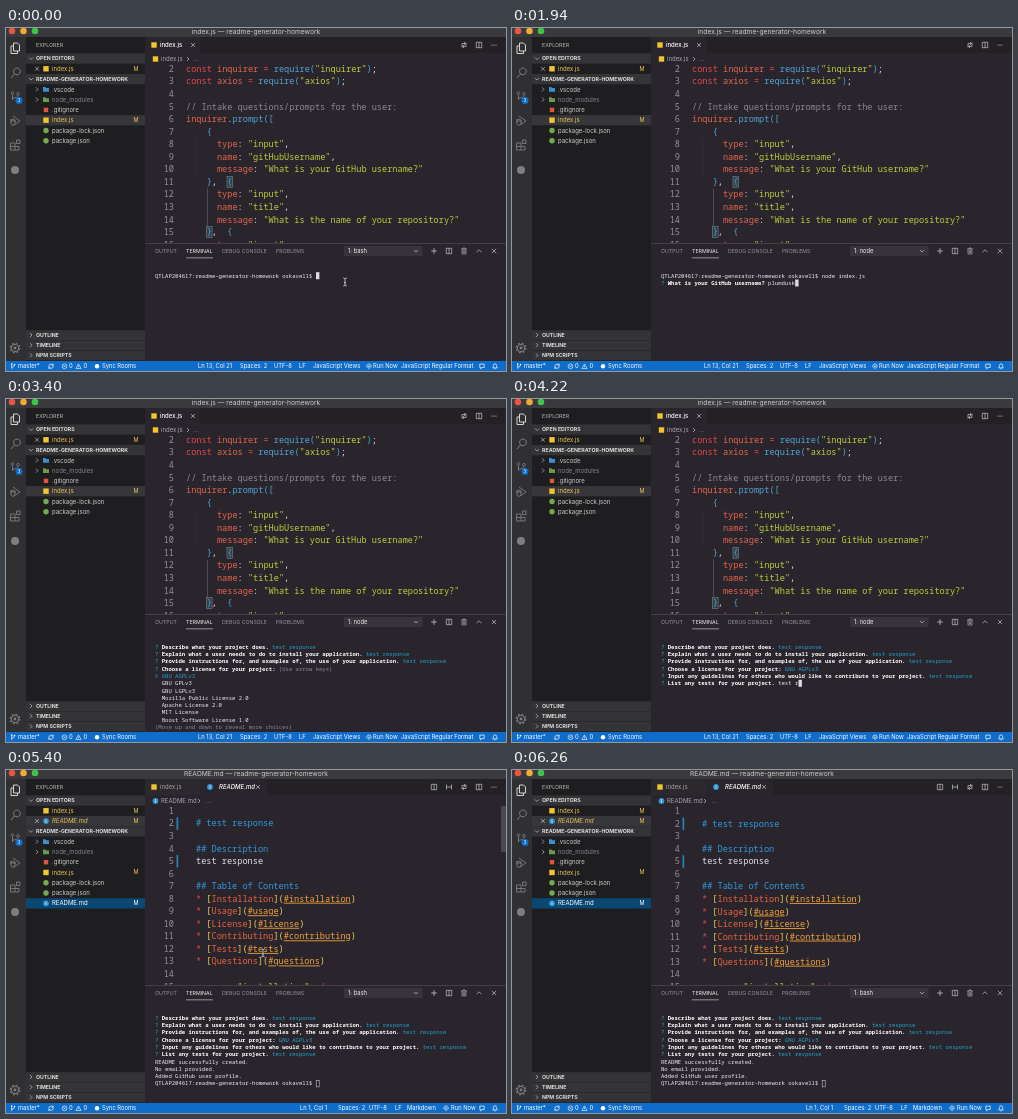
Animation of 500 by 343 pixels, one loop 6280 ms. Source, as an HTML page:

```html
<!DOCTYPE html>
<html lang="en">
<head>
<meta charset="utf-8">
<title>Readme generator demo</title>
<style>
  html, body { margin: 0; width: 100%; height: 100%; overflow: hidden; background: #1e1e20; }
  svg { display: block; width: 100vw; height: 100vh; }
  text { white-space: pre; }
  .ui { font-family: Inter, "Liberation Sans", sans-serif; }
  .mono { font-family: "Noto Sans Mono", "DejaVu Sans Mono", monospace; }
</style>
</head>
<body>
<svg id="stage" viewBox="0 0 500 343" preserveAspectRatio="none" xmlns="http://www.w3.org/2000/svg">
  <defs>
    <clipPath id="editorClip"><rect x="139" y="36" width="361" height="179"/></clipPath>
    <clipPath id="panelClip"><rect x="139" y="232" width="361" height="101"/></clipPath>
  </defs>
  <g id="chrome"></g>
  <g id="header"></g>
  <g id="sidebar"></g>
  <g clip-path="url(#editorClip)"><g id="editor"></g></g>
  <g id="panel"></g>
  <g clip-path="url(#panelClip)"><g id="terminal"></g></g>
  <g id="status"></g>
  <g id="mouse"></g>
</svg>
<script>
const LOOP = 6280, CODE = 8.6, CODE_ADV = 5.16, PITCH = 12.55;
const TERM = 5.59, TERM_ADV = 3.354, TERM_PITCH = 7.32;
const C = {
  red: '#e5484a', orange: '#e8643c', amber: '#f2a33a', yellow: '#f2d35b', lime: '#b9d03c', blue: '#2f9be0',
  sky: '#4fa6d6', white: '#e4e0e6', grey: '#8d8791', cyan: '#22a3cf', green: '#23c08a', mod: '#ecc257', icon: '#c5c5c8'
};
const LAUNCH_AT = 1080, WRITTEN_AT = 4380, FOCUS_AT = 4900, OPEN_AT = 5100;

const esc = s => s.replace(/&/g, '&amp;').replace(/</g, '&lt;');
const rect = (x, y, w, h, fill, extra = '') =>
  `<rect x="${x}" y="${y}" width="${w}" height="${h}" fill="${fill}" ${extra}/>`;
const dot = (x, y, r, fill) => `<circle cx="${x}" cy="${y}" r="${r}" fill="${fill}"/>`;
const stroke = (d, color = C.icon, w = .8, at = [0, 0]) =>
  `<path d="${d}" transform="translate(${at})" fill="none" stroke="${color}" stroke-width="${w}"/>`;
const ui = (x, y, s, size = 6, fill = '#ccc', extra = '') =>
  `<text class="ui" x="${x}" y="${y + size * .36}" font-size="${size}" fill="${fill}" ${extra}>${esc(s)}</text>`;
const mono = (x, y, size, parts, extra = '') =>
  `<text class="mono" x="${x}" y="${y + size * .34}" font-size="${size}" ${extra}>` +
  parts.map(([fill, s, attr = '']) => `<tspan fill="${fill}" ${attr}>${esc(s)}</tspan>`).join('') + '</text>';

const chevron = (x, y, open) =>
  stroke(open ? 'M-2 -1L0 1L2 -1' : 'M-1 -2L1 0L-1 2', C.icon, .7, [x, y]);
const cross = (x, y, r = 1.9) => stroke(`M${-r} ${-r}L${r} ${r}M${r} ${-r}L${-r} ${r}`, C.icon, .7, [x, y]);
const splitIcon = (x, y) => stroke('M-2.7 -2.7H2.7V2.7H-2.7ZM0 -2.7V2.7', C.icon, .7, [x, y]);
const info = (x, y) => dot(x, y, 2.9, '#2f94d6') + rect(x - .4, y - .5, .8, 2, '#fff') + rect(x - .4, y - 1.7, .8, .7, '#fff');
const scriptIcon = (x, y) => rect(x - 2.7, y - 2.7, 5.4, 5.4, '#f2c42e');
const folder = (x, y, fill) => `<path d="M${x - 3} ${y - 2.3}h2.3l.9 .9h2.8v3.8h-6z" fill="${fill}"/>`;

// Linear interpolation through [time, ...values] points
function track(t, points) {
  if (t <= points[0][0]) return points[0].slice(1);
  for (let i = 1; i < points.length; i++) {
    const [a, ...from] = points[i - 1], [b, ...to] = points[i];
    if (t <= b) return from.map((v, k) => v + (to[k] - v) * (t - a) / (b - a));
  }
  return points[points.length - 1].slice(1);
}

const cache = {};
function put(id, html) {
  if (cache[id] === html) return;
  cache[id] = html;
  document.getElementById(id).innerHTML = html;
}

function drawChrome() {
  const on = '#e6e6e6', off = '#7e7e82';
  let h = rect(0, 0, 500, 343, '#1e1e20') + rect(0, 0, 500, 9, '#3a393d') +
    rect(0, 9, 20, 324, '#303033') + rect(139, 9, 361, 324, '#2a242d');
  h += ['#e8563f', '#f3aa2f', '#3cc645'].map((c, i) => dot(6 + i * 11.5, 3, 3.3, c)).join('');
  h += stroke('M-2 -5H2L4 -3V3H-2ZM-2 -2H-4.5V5.5H2V3', on, .9, [9.5, 20]);
  h += stroke('M1 -5A3.4 3.4 0 1 1 .9 -5M-1.5 1L-5 5', off, 1, [10, 45]);
  h += stroke('M-2.5 -2.5V3M3 -2Q3 1 -2.5 1.2M-2.5 -5.3A1.3 1.3 0 1 1 -2.6 -5.3M3 -4.6A1.3 1.3 0 1 1 2.9 -4.6', off, .9, [9, 69]);
  h += dot(13, 72.5, 3.5, '#0f6cc9') + ui(13, 72.5, '3', 4.6, '#fff', 'text-anchor="middle"');
  h += stroke('M-2 -5L5 0L-1 4M-5 0H1M-4 -2V3Q-2 6 0 3V-1Q-2 -3 -4 -1', off, .9, [9, 93]);
  h += stroke('M-4.5 -2H0V5H-4.5ZM-4.5 1.5H4V5H0M1.5 -5H5V-1.5H1.5Z', off, .9, [9, 117]);
  h += dot(9, 142, 4, off);
  h += dot(9, 320, 1.4, off) + `<circle cx="9" cy="320" r="3.7" fill="none" stroke="${off}" stroke-width="1"/>` +
    `<circle cx="9" cy="320" r="4.8" fill="none" stroke="${off}" stroke-width="1.2" stroke-dasharray="1.9 1.87"/>`;
  h += ui(30, 17, 'EXPLORER', 5.3, '#bbb');
  ['OUTLINE', 'TIMELINE', 'NPM SCRIPTS'].forEach((s, i) => {
    const y = 307 + i * 10.2;
    h += rect(20, y - 4.8, 119, 9.8, '#343437') + chevron(25, y) + ui(30, y, s, 5.2, '#ddd', 'font-weight="700"');
  });
  put('chrome', h);
}

function drawHeader(opened) {
  const file = opened ? 'README.md' : 'index.js';
  let h = ui(250, 3.5, `${file} — readme-generator-homework`, 6.7, '#ccc', 'text-anchor="middle"');
  h += rect(139, 9, 361, 16, '#242126');
  h += opened ? rect(139, 9, 55.5, 16, '#2b282e') + rect(195, 9, 66, 16, '#2a242d') : rect(139, 9, 55.5, 16, '#2a242d');
  h += scriptIcon(148, 17) + ui(154, 17, 'index.js', 6, opened ? '#a5a0a8' : '#fff', opened ? '' : 'font-weight="500"');
  if (opened) h += info(204, 17) + ui(213, 17, 'README.md', 6, '#fff', 'font-style="italic" font-weight="500"') + cross(252, 17);
  else h += cross(187, 17);
  if (opened) h += splitIcon(428, 17) + stroke('M-2.5 -2.5V2.5M2.5 -2.5V2.5M-2.5 0H2.5', C.icon, .7, [443, 17]);
  h += stroke('M-2 2.5V-1.5H1M2 -2.5V1.5H-1M0 -3L1.5 -1.5L0 0M0 0L-1.5 1.5L0 3', C.icon, .7, [458, 17]);
  h += splitIcon(473, 17) + [-2, 0, 2].map(d => dot(488 + d, 17, .6, C.icon)).join('');
  h += (opened ? info : scriptIcon)(149.5, 31) + ui(155, 31, file, 6, '#aaa6ad') +
    chevron(opened ? 193 : 182, 31) + ui(opened ? 200 : 187, 31, '...', 6, '#aaa6ad');
  put('header', h);
}

function drawSidebar(hover, written, focused, opened) {
  let y = 30.5, h = '';
  const step = 10.28, active = '#0a4874', inactive = '#37373b';
  const bar = fill => rect(20, y - 5.1, 119, step, fill);
  const title = s => {
    h += bar('#343437') + chevron(25, y, true) + ui(30, y, s, 5.25, '#ddd', 'font-weight="700"');
    y += step;
  };
  const row = (icon, name, { fill = '#ccc', bg, modified, twisty, italic } = {}) => {
    const color = bg === active ? '#fff' : modified ? C.mod : fill;
    if (bg) h += bar(bg);
    if (twisty) h += chevron(31, y);
    h += icon + ui(46, y, name, 6, color, italic ? 'font-style="italic"' : '');
    if (modified) h += ui(130, y, 'M', 5.5, color, 'text-anchor="middle"');
    y += step;
  };
  title('OPEN EDITORS');
  if (!opened) h += cross(31, y);
  row(scriptIcon(40, y), 'index.js', { modified: true });
  if (opened) {
    h += bar(inactive) + cross(31, y);
    row(info(40, y), 'README.md', { modified: true, italic: true });
  }
  const headY = y;
  title(hover ? 'README-GENERAT...' : 'README-GENERATOR-HOMEWORK');
  if (hover) {
    h += stroke('M-2 -2.7H1V2.7H-2ZM1 1H3.5', C.icon, .7, [94, headY]) +
      stroke('M-3 -2H-.5L.5 -1H3V2.5H-3Z', C.icon, .7, [107, headY]) +
      stroke('M2.2 -1A2.5 2.5 0 1 0 2.3 1M2.5 -3V-.8H.5', C.icon, .7, [120, headY]) +
      stroke('M-2.5 -1H1.2V2.5H-2.5ZM-1 -1V-2.6H2.8V1H1.2M-1.5 .8H.3', C.icon, .7, [133, headY]);
  }
  row(folder(40, y, '#3c8fd0'), '.vscode', { twisty: true });
  row(folder(40, y, '#6c9a4a'), 'node_modules', { twisty: true, fill: '#858588' });
  row(rect(37.8, y - 2.2, 4.4, 4.4, '#e2553a'), '.gitignore');
  row(scriptIcon(40, y), 'index.js', { modified: true, bg: opened ? '' : focused ? active : inactive });
  row(dot(40, y, 2.7, '#72ad4b'), 'package-lock.json');
  row(dot(40, y, 2.7, '#72ad4b'), 'package.json');
  if (written) row(info(40, y), 'README.md', { modified: true, bg: opened ? active : hover ? '#2a2d2e' : '' });
  put('sidebar', h);
}

const question = (name, message) => ['      type: "input",', `      name: "${name}",`, `      message: "${message}"`];
const script = ['', 'const inquirer = require("inquirer");', 'const axios = require("axios");', '',
  '// Intake questions/prompts for the user:', 'inquirer.prompt([', '    {',
  ...question('gitHubUsername', 'What is your GitHub username?'), '    },  {',
  ...question('title', 'What is the name of your repository?'), '    },  {', '      type: "input",'];

const sections = ['Installation', 'Usage', 'License', 'Contributing', 'Tests', 'Questions'];
const readme = ['', '# test response', '', '## Description', 'test response', '', '## Table of Contents',
  ...sections.map(s => `* [${s}](#${s.toLowerCase()})`), '',
  ...sections.flatMap(s => [`<a name="${s.toLowerCase()}"></a>`, `## ${s}`, 'test response', ''])];

function paintScript(s) {
  if (s.startsWith('//')) return [[C.grey, s]];
  return (s.match(/"[^"]*"|\w+|\s+|[^\w\s"]/g) || []).map(w => [
    w[0] === '"' ? C.lime : w === 'const' || w === '=' ? C.red :
    /^(require|prompt|[()[\]{}])$/.test(w) ? C.sky : /^\w/.test(w) ? '#e2664c' : C.white, w]);
}

function paintReadme(s, i) {
  if (s[0] === '#') return [[C.blue, s]];
  const link = s.match(/^\* \[(\w+)\]\((.+)\)$/);
  if (link) return [[C.red, '* '], [C.yellow, '['], [C.orange, link[1]], [C.yellow, ']('],
    [C.amber, link[2], 'text-decoration="underline"'], [C.yellow, ')']];
  const anchor = s.match(/^<a name=(".+")><\/a>$/);
  if (anchor) return [[C.red, '<a '], [C.orange, 'name'], [C.white, '='], [C.lime, anchor[1]], [C.red, '></a>']];
  return [[i > 13 ? C.orange : C.white, s]];
}

function drawEditor(opened, scroll, hint) {
  const lines = opened ? readme : script;
  const top = opened ? 41.2 - scroll : 41 - PITCH;
  const x = opened ? 190 : 180;
  const yOf = n => top + (n - 1) * PITCH;
  let h = '';
  if (!opened) {
    h += rect(201, yOf(12) - 6, .5, PITCH * 3, '#77707b') + rect(190.5, yOf(8) - 6, .4, PITCH * 3, '#423b46');
    h += [[11, 8], [15, 4]].map(([n, col]) =>
      rect(x + col * CODE_ADV - .3, yOf(n) - 5.6, CODE_ADV + .6, 11, '#31404a', 'stroke="#87918f" stroke-width=".5"')).join('');
    if (hint) h += dot(146, yOf(14), 1.8, '#8c2831');
  }
  lines.forEach((s, i) => {
    const y = yOf(i + 1);
    if (y < 25 || y > 225) return;
    h += mono(168, y, CODE, [['#96909a', String(i + 1)]], 'text-anchor="end"');
    h += mono(x, y, CODE, (opened ? paintReadme : paintScript)(s, i));
    if (opened && [2, 5, 17].includes(i + 1)) h += rect(170.5, y - 6.2, 1.7, PITCH, '#2385b8');
  });
  if (opened && scroll) h += rect(495, 36 + scroll * .24, 5, 46, '#4c464f');
  put('editor', h);
}

function drawPanel(running) {
  let h = rect(139, 215, 361, 118, '#2a242d') + rect(139, 215, 361, .6, '#57515b');
  [[149, 'OUTPUT'], [180, 'TERMINAL'], [216, 'DEBUG CONSOLE'], [270, 'PROBLEMS']].forEach(([x, s]) => {
    h += ui(x, 223, s, 5.25, s === 'TERMINAL' ? '#eee' : '#99949c');
  });
  h += rect(180, 229.6, 27, .6, '#ddd') + rect(338, 218, 78.5, 10, '#38343b') +
    ui(342, 223, running ? '1: node' : '1: bash', 5.8, '#eee') + chevron(410, 223, true);
  h += stroke('M-2.8 0H2.8M0 -2.8V2.8', C.icon, .8, [428, 223]) + splitIcon(443, 223) +
    stroke('M-2.8 -2H2.8M-1 -2V-3H1V-2M-2 -2V3H2V-2M-.6 -.8V2M.6 -.8V2', C.icon, .6, [458, 223]) +
    stroke('M-2.4 1.2L0 -1.2L2.4 1.2', C.icon, .7, [473, 223]) + cross(488, 223, 2.2);
  put('panel', h);
}

const shell = 'QTLAP204617:readme-generator-homework oskavell$ ';
const REPLY = 'test response';
// [shown, typing starts, typing ends, submitted, prompt, answer]
const prompts = [
  [1240, 1400, 1920, 2050, 'What is your GitHub username?', 'plumdusk'],
  [2050, 2130, 2350, 2400, 'What is the name of your repository?', REPLY],
  [2400, 2470, 2660, 2710, 'Describe what your project does.', REPLY],
  [2710, 2770, 2960, 3010, 'Explain what a user needs to do to install your application.', REPLY],
  [3010, 3070, 3250, 3300, 'Provide instructions for, and examples of, the use of your application.', REPLY],
  [3300, 0, 0, 3760, 'Choose a license for your project:', 'GNU AGPLv3'],
  [3760, 3830, 4020, 4070, 'Input any guidelines for others who would like to contribute to your project.', REPLY],
  [4070, 4130, 4310, 4360, 'List any tests for your project.', REPLY]
];
const licenses = ['GNU AGPLv3', 'GNU GPLv3', 'GNU LGPLv3', 'Mozilla Public License 2.0',
  'Apache License 2.0', 'MIT License', 'Boost Software License 1.0'];
const typed = (s, t, from, to) => s.slice(0, Math.max(0, Math.min(s.length, Math.floor((t - from) / (to - from) * s.length + .01))));

function drawTerminal(t) {
  const plain = '#f0edf2';
  const rows = [[[plain, shell + typed('node index.js', t, 320, 950)]]];
  let pointer = -1, cursor = true;
  prompts.forEach(([shown, from, to, sent, text, answer]) => {
    if (t < shown) return;
    const parts = [[C.green, '? '], ['#fff', text + ' ', 'font-weight="700"']];
    rows.push(parts);
    if (t >= sent) parts.push([C.cyan, answer]);
    else if (from) parts.push([plain, typed(answer, t, from, to)]);
    else {
      cursor = false;
      pointer = rows.length;
      parts.push([C.grey, '(Use arrow keys)']);
      licenses.forEach((s, i) => rows.push([[i ? plain : C.cyan, '  ' + s]]));
      rows.push([[C.grey, '(Move up and down to reveal more choices)']]);
    }
  });
  if (t >= LAUNCH_AT && t < prompts[0][0]) rows.push([[plain, '']]);
  if (t >= WRITTEN_AT) ['README successfully created.', 'No email provided.', 'Added GitHub user profile.', shell]
    .forEach(s => rows.push([[plain, s]]));
  const hidden = t >= prompts[5][0] ? 3 : 0;
  const yOf = i => 247.7 + (i - hidden) * TERM_PITCH;
  let h = rows.map((parts, i) => i < hidden ? '' : mono(149, yOf(i), TERM, parts)).join('');
  if (pointer >= 0) h += stroke('M.5 -2L2.3 0L.5 2', C.cyan, .8, [149, yOf(pointer)]);
  if (cursor) {
    const last = rows.length - 1;
    const length = rows[last].reduce((n, p) => n + p[1].length, 0);
    const x = 149 + length * TERM_ADV, y = yOf(last) - 3.5;
    h += t < FOCUS_AT ? rect(x, y, 3.4, 7, '#dedbe0') : rect(x + .2, y + .2, 3, 6.6, 'none', 'stroke="#dedbe0" stroke-width=".5"');
  }
  put('terminal', h);
}

function drawStatus(opened) {
  const y = 338.3, w = '#fff';
  const labels = opened
    ? [[294, 'Ln 1, Col 1'], [332, 'Spaces: 2'], [363, 'UTF-8'], [389, 'LF'], [401, 'Markdown'], [445, 'Run Now']]
    : [[192, 'Ln 13, Col 21'], [234, 'Spaces: 2'], [268, 'UTF-8'], [293, 'LF'], [307, 'JavaScript Views'],
       [367, 'Run Now'], [395, 'JavaScript Regular Format']];
  let h = rect(0, 333, 500, 10, '#0f6cc9');
  h += stroke('M-1.3 -2V2.5M1.5 -1.5Q1.5 .7 -1.3 1', w, .7, [7, y]) + dot(5.7, y - 2.2, .8, w) + dot(8.5, y - 1.8, .8, w);
  h += ui(12, y, 'master*', 5.8, w);
  h += stroke('M-2.3 .3A2.4 2.4 0 0 1 2 -1.2M2.3 -.3A2.4 2.4 0 0 1 -2 1.2M2.2 -2.6V-1H.6M-2.2 2.6V1H-.6', w, .7, [45, y]);
  h += `<circle cx="58.5" cy="${y}" r="2.4" fill="none" stroke="${w}" stroke-width=".6"/>` +
    stroke('M-1 -1L1 1M1 -1L-1 1', w, .6, [58.5, y]) + ui(63, y, '0', 5.8, w) +
    stroke('M0 -2.4L2.6 2.2H-2.6ZM0 -.8V1', w, .6, [72.5, y]) + ui(77.5, y, '0', 5.8, w);
  h += dot(91, y, 2.2, w) + ui(96, y, 'Sync Rooms', 5.8, w);
  h += labels.map(([x, s]) => ui(x, y, s, 5.8, w)).join('');
  h += stroke('M0 0V2.8M-1.6 1.4A2.2 2.2 0 1 1 1.6 1.4', w, .7, [opened ? 440 : 363, y]) + dot(opened ? 440 : 363, y, .7, w);
  h += stroke('M-2.2 -2.2H2.2V1.2H0L-1.4 2.6V1.2H-2.2Z', w, .7, [476, y]) +
    stroke('M-2.4 1.6H2.4L1.6 .5V-.8Q1.5 -2.5 0 -2.5T-1.6 -.8V.5ZM-.7 2.5H.7', w, .7, [489, y]);
  put('status', h);
}

function mouseAt(t) {
  if (t < 320) return [339, 254];
  if (t < 4440 || t > 6050) return null;
  return track(t, [[4440, 339, 254], [4500, 339, 254], [4720, 146, 192], [4900, 75, 127],
    [5170, 75, 127], [5380, 257, 183], [6050, 257, 183]]);
}

function drawMouse(pos) {
  if (!pos) return put('mouse', '');
  const [x, y] = pos;
  const beam = 'M-1.8 -4Q0 -4 0 -2.8Q0 -4 1.8 -4M0 -2.8V2.8M-1.8 4Q0 4 0 2.8Q0 4 1.8 4M-1 .8H1';
  const hand = 'M-1.6 -4Q-.8 -4.8 -.3 -4V-1L2.5 -.3Q3.4 0 3.2 1L2.5 4.2H-1.3L-3.4 1.2Q-3.3 0 -1.6 1Z';
  const pointing = x < 139;
  put('mouse', pointing
    ? `<path d="${hand}" transform="translate(${x} ${y})" fill="#fff" stroke="#111" stroke-width=".6"/>`
    : stroke(beam, '#111', 1.5, pos) + stroke(beam, '#eee', .8, pos));
}

function draw(t) {
  const opened = t >= OPEN_AT, mouse = mouseAt(t);
  const [scroll] = track(t, [[5400, 0], [5620, 56], [5800, 105], [5880, 105], [6180, 0]]);
  drawHeader(opened);
  drawSidebar(!!mouse && mouse[0] < 139, t >= WRITTEN_AT, t >= FOCUS_AT, opened);
  drawEditor(opened, scroll, t >= 4720);
  drawPanel(t >= LAUNCH_AT && t < WRITTEN_AT);
  drawTerminal(t);
  drawStatus(opened);
  drawMouse(mouse);
}

drawChrome();
const start = performance.now();
function tick() {
  draw((performance.now() - start) % LOOP);
  requestAnimationFrame(tick);
}
tick();
</script>
</body>
</html>
```
